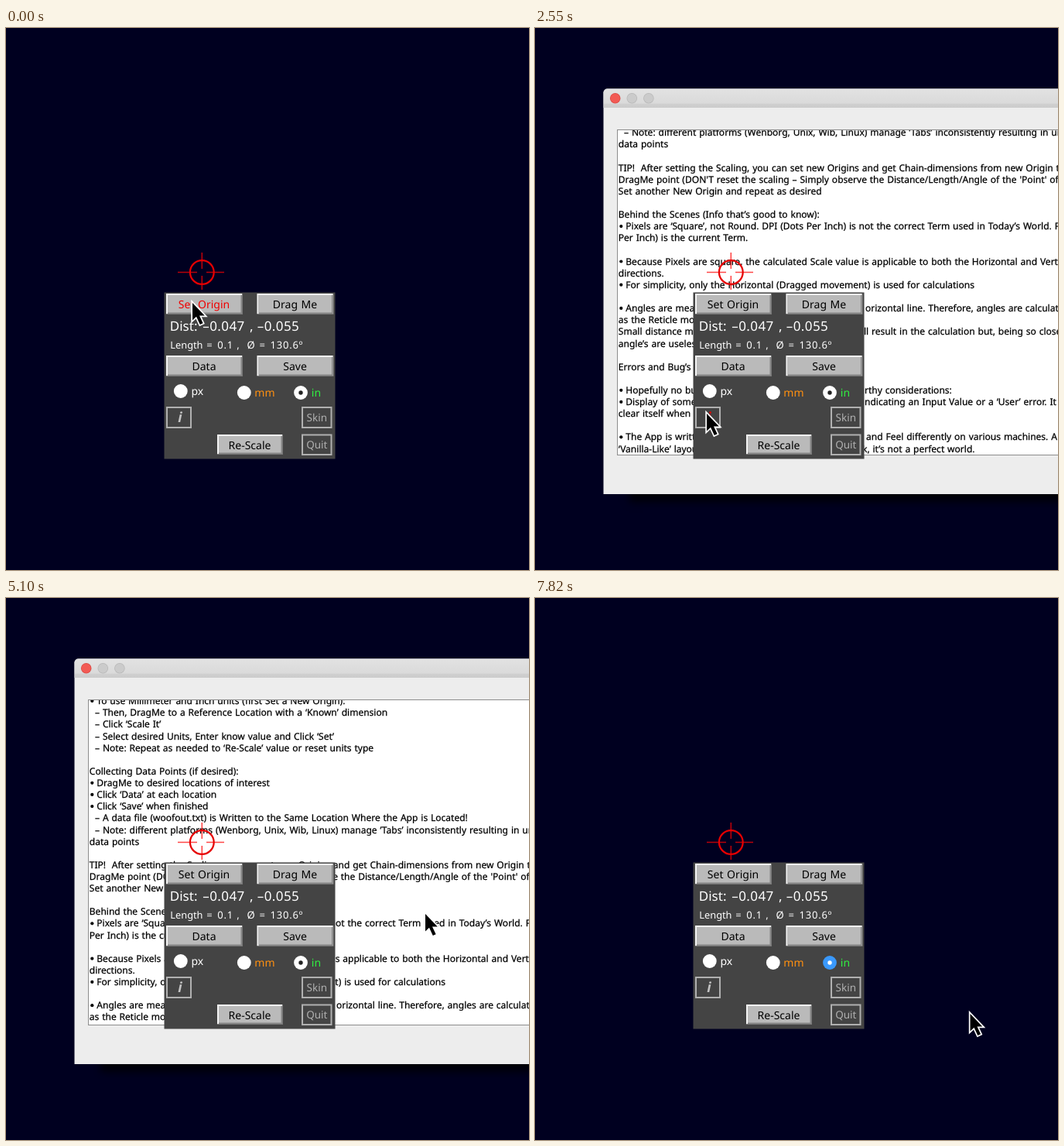
An HTML page with a canvas that plays this animation: 676 by 700 pixels, repeating every 7.99 s.

```html
<!DOCTYPE html>
<html lang="en">
<head>
<meta charset="utf-8">
<title>Screen ruler</title>
<style>
html, body { margin: 0; width: 100%; height: 100%; overflow: hidden; background: #000020; }
canvas { display: block; }
</style>
</head>
<body>
<canvas id="stage" width="676" height="700"></canvas>
<script>
const ctx = document.getElementById('stage').getContext('2d');
const LOOP = 7990, STEP = 170;
const OPEN = 2550, CLOSE = 7140, FOCUS = 1190;
const SANS = '"Noto Sans", "Open Sans", sans-serif';

// "left|x|right" continues a line at x, where it emerges from behind the panel.
const HELP = `What It Does:

• Displays current Screen Position of Target Reticle, Distance and Angle
• Scales a ‘Displayed Object’ (any Image on the Screen) using a Known Horizontal Dimension
• Outputs a data file with saved Data Points. File is located in the folder of App’s location

Platform Requirements:
Java8 (1.8) is required. For non-programmers, only the JRE is needed.
*** Use the Official Java, it's from Quorin ***

The GUI (Graphic User Interface):
• Optional ’Skins and Reticle’ [Right-Click Skin button]
• Left-Click the info button
• Remains ‘On Top’ of Windows for easy access
• Position (Distance) is the Reticle location relative|428|to Origin
• Length (L) is the distance and Ø the Angle with respec|425|t to Horizontal with 0º< range>+180º

Usage:
• The Most Important: do not change the current Disp|425|lay of your Object (such as Window movement,
Zooming…etc) While measuring your Object
TIP! Plan ahead: Move the Object into place before S|425|caling
• At boot-up, Pixel positions are displayed in Pi|424|xel units

• To set a new origin:
  – DragMe to new location
  – Click ‘New Origin’

• To use Millimeter and Inch units (first Set a New Origin):
  – Then, DragMe to a Reference Location with a ‘Known’ dimension
  – Click ‘Scale It’
  – Select desired Units, Enter know value and Click ‘Set’
  – Note: Repeat as needed to ‘Re-Scale’ value or reset units type

Collecting Data Points (if desired):
• DragMe to desired locations of interest
• Click ‘Data’ at each location
• Click ‘Save’ when finished
  – A data file (woofout.txt) is Written to the Same Location Where the App is Located!
  – Note: different platforms (Wenborg, Unix, Wib, Linux) manage ’Tabs’ inconsistently resulting in uneven
data points

TIP!  After setting the Scaling, you can set new Origins and get Chain-dimensions from new Origin to
DragMe point (DON'T reset the scaling – Simply observe the Distance/Length/Angle of the 'Point' of
Set another New Origin and repeat as desired

Behind the Scenes (Info that’s good to know):
• Pixels are ‘Square’, not Round. DPI (Dots Per Inch) is not the correct Term used in Today’s World. PPI
Per Inch) is the current Term.

• Because Pixels are square, the calculated Scale value is applicable to both the Horizontal and Vertical
directions.
• For simplicity, only the Horizontal (Dragged movement) is used for calculations

• Angles are measured from the Origin and its H|427|orizontal line. Therefore, angles are calculated
as the Reticle moves
Small distance moves near the Origin wi|425|ll result in the calculation but, being so close,
angle’s are useless

Errors and Bug’s

• Hopefully no bugs but here are notewo|426|rthy considerations:
• Display of some odd value is likely i|426|ndicating an Input Value or a ‘User’ error. It will
clear itself when fixed

• The App is written in Java and may Look|428|and Feel differently on various machines. A
‘Vanilla-Like’ layout was used but, loo|423|k, it’s not a perfect world.`.split('\n');

// Pointer stops: time, x, y.
const PATH = [
  [0, 241, 355], [680, 241, 355], [2040, 222, 498], [3060, 222, 498],
  [4080, 378, 390], [4420, 378, 390], [5100, 542, 408], [6120, 542, 408],
  [6800, 700, 590], [7140, 700, 590], [7820, 562.5, 537]
];

// Buttons: label, x, y, width, height.
const RAISED = [
  ['Set Origin', 207, 343, 99, 27], ['Drag Me', 324.5, 343, 99, 27],
  ['Data', 207, 423, 99, 27], ['Save', 324.5, 423, 99, 27],
  ['Re-Scale', 273, 525, 85, 26]
];
const FLAT = [
  ['i', 207, 489, 33, 28], ['Skin', 382, 489, 39.5, 28], ['Quit', 382, 524.5, 39.5, 27.5]
];

const smooth = u => (1 - Math.cos(Math.PI * Math.min(1, Math.max(0, u)))) / 2;
const inside = (p, x, y, w, h) => p.x >= x && p.x < x + w && p.y >= y && p.y < y + h;

function pointerAt(t) {
  let i = 0;
  while (i < PATH.length - 2 && t >= PATH[i + 1][0]) i++;
  const [t0, x0, y0] = PATH[i], [t1, x1, y1] = PATH[i + 1];
  const k = smooth((t - t0) / (t1 - t0));
  return { x: x0 + (x1 - x0) * k, y: y0 + (y1 - y0) * k };
}

function rect(x, y, w, h, color) {
  ctx.fillStyle = color;
  ctx.fillRect(x, y, w, h);
}

function rounded(y, h, fill) {
  ctx.fillStyle = fill;
  ctx.beginPath();
  ctx.roundRect(88.5, y, 700, h, [5, 5, 0, 0]);
  ctx.fill();
}

function disc(x, y, r, color) {
  ctx.fillStyle = color;
  ctx.beginPath();
  ctx.arc(x, y, r, 0, 2 * Math.PI);
  ctx.fill();
}

function text(str, x, y, size, color, opts = {}) {
  const { align = 'left', track = 0, gap = 0.9, style = '', bolden = 0 } = opts;
  ctx.font = `${style} ${size}px ${SANS}`;
  ctx.textAlign = align;
  ctx.letterSpacing = track + 'px';
  ctx.wordSpacing = gap + 'px';
  ctx.fillStyle = color;
  ctx.fillText(str, x, y);
  if (bolden) {
    ctx.strokeStyle = color;
    ctx.lineWidth = bolden;
    ctx.lineJoin = 'round';
    ctx.strokeText(str, x, y);
  }
}

function drawHelp(scroll) {
  ctx.save();
  ctx.shadowColor = 'rgba(0,0,0,0.8)';
  ctx.shadowBlur = 10;
  ctx.shadowOffsetY = 10;
  rect(122, 120, 700, 482, '#ededed');
  ctx.restore();
  rounded(78.5, 523.5, '#ededed');

  const bar = ctx.createLinearGradient(0, 79, 0, 103);
  bar.addColorStop(0, '#e2e2e2');
  bar.addColorStop(0.75, '#dadada');
  bar.addColorStop(0.82, '#cecece');
  bar.addColorStop(1, '#cccccc');
  rounded(78.5, 24.5, bar);
  ['#f25a54', '#cbcbcb', '#cbcbcb'].forEach((color, i) => {
    const x = 103.7 + i * 21.6;
    disc(x, 90.8, 6.8, i ? '#b8b8b8' : '#d94a45');
    disc(x, 90.8, 6, color);
  });

  rect(106, 131, 600, 421, '#8c8c8c');
  rect(107, 132, 600, 419, '#fff');
  ctx.save();
  ctx.beginPath();
  ctx.rect(107, 132, 600, 419);
  ctx.clip();
  HELP.forEach((line, i) => {
    const y = 144.8 + i * 15.12 - scroll;
    if (!line || y < 120 || y > 570) return;
    const [left, x, right] = line.split('|');
    const write = (s, sx) => text(s, sx, y, 12.02, '#000', { gap: 0.75, bolden: 0.25 });
    if (left[0] === '•') {
      disc(111.3, y - 4.2, 2.1, '#000');
      write(left.slice(2), 117.3);
    } else if (left.startsWith('  ')) {
      write(left.trim(), 115);
    } else {
      write(left, 107.8);
    }
    if (right) write(right, +x);
  });
  ctx.restore();
}

function drawReticle() {
  ctx.strokeStyle = 'rgba(255,0,0,0.72)';
  ctx.lineWidth = 1.6;
  ctx.beginPath();
  for (const [a, b] of [[222, 247], [259, 282]]) {
    ctx.moveTo(a, 315.5);
    ctx.lineTo(b, 315.5);
  }
  for (const [a, b] of [[290, 311], [320, 338]]) {
    ctx.moveTo(253.3, a);
    ctx.lineTo(253.3, b);
  }
  ctx.stroke();
  ctx.strokeStyle = '#e60000';
  ctx.lineWidth = 2.2;
  ctx.beginPath();
  ctx.arc(253.3, 315.5, 15.4, 0, 2 * Math.PI);
  ctx.stroke();
}

function drawPanel(p, focused) {
  rect(204.5, 341.5, 221, 215, '#444');

  for (const [label, x, y, w, h] of RAISED) {
    rect(x, y, w, h, '#777');
    rect(x, y, w - 1, h - 1, '#f4f4f4');
    rect(x + 2, y + 2, w - 3, h - 3, '#858585');
    rect(x + 2, y + 2, w - 4.5, h - 4.5, '#bababa');
    const hot = label === 'Set Origin' && inside(p, x, y, w, h);
    text(label, x + w / 2 - 0.5, y + 18.8, 14, hot ? '#f00000' : '#000', { align: 'center' });
  }

  for (const [label, x, y, w, h] of FLAT) {
    ctx.strokeStyle = '#b0b0b0';
    ctx.lineWidth = 2;
    ctx.lineJoin = 'miter';
    ctx.strokeRect(x + 1, y + 1, w - 2, h - 2);
    if (label === 'i') {
      text(label, 224.8, 509, 18, inside(p, x, y, w, h) ? '#e00000' : '#c4c4c4',
        { align: 'center', style: 'italic bold' });
    } else {
      text(label, x + w / 2, y + 18.8, 13.5, '#b0b0b0', { align: 'center' });
    }
  }

  const big = { track: 0.4 }, small = { track: 0.75 };
  text('Dist:', 211.8, 391.3, 17, '#fff');
  text('–0.047', 254.3, 391.3, 17, '#fff', big);
  text(',', 315, 391.3, 17, '#fff');
  text('–0.055', 324.8, 391.3, 17, '#fff', big);
  text('Length', 212.3, 413.6, 12.8, '#fff');
  text('=', 259.3, 413.6, 13, '#fff', small);
  text('0.1', 273.3, 413.6, 13, '#fff', small);
  text(',', 298.3, 413.6, 13, '#fff');
  text('Ø', 311.6, 413.6, 13, '#fff');
  text('=', 327.6, 413.6, 13, '#fff', small);
  text('130.6º', 341.6, 413.6, 13, '#fff', small);

  disc(225.8, 469, 8.9, '#fff');
  disc(307.8, 471, 8.9, '#fff');
  disc(381, 471, 8.9, focused ? '#3a99fc' : '#fff');
  disc(381, 471, 2.7, focused ? '#fff' : '#222');
  text('px', 239.5, 474, 14, '#fff');
  text('mm', 321.3, 476, 14, '#ff9010');
  text('in', 394.8, 476, 14, '#30f040');
}

function drawArrow(x, y) {
  ctx.beginPath();
  [[0, 0], [0, 22.5], [5, 17.8], [9.8, 28], [13.6, 26.2], [9, 16.5], [15.8, 16.5]]
    .forEach(([dx, dy]) => ctx.lineTo(x + dx, y + dy));
  ctx.closePath();
  ctx.lineJoin = 'miter';
  ctx.strokeStyle = '#fff';
  ctx.lineWidth = 3.4;
  ctx.stroke();
  ctx.fillStyle = '#000';
  ctx.fill();
}

function drawCross(x, y) {
  for (const [r, half, color] of [[13.5, 3.6, '#fff'], [11.5, 1.6, '#444']]) {
    rect(x - r, y - half, 2 * r, 2 * half, color);
    rect(x - half, y - r, 2 * half, 2 * r, color);
  }
}

function draw(t) {
  const open = t >= OPEN && t < CLOSE;
  const p = pointerAt(t);
  rect(0, 0, 676, 700, '#000020');
  if (open) drawHelp(580 * (1 - smooth((t - 4590) / 1428)));
  drawReticle();
  drawPanel(p, t >= FOCUS && !open);
  const onButton = [...RAISED, ...FLAT].some(([, ...box]) => inside(p, ...box));
  if (inside(p, 204, 341, 221, 215) && !onButton) drawCross(p.x, p.y);
  else drawArrow(p.x, p.y);
}

ctx.textRendering = 'geometricPrecision';

function tick() {
  const t = performance.now() % LOOP;
  draw(Math.floor(t / STEP) * STEP);
  requestAnimationFrame(tick);
}
tick();
</script>
</body>
</html>
```
